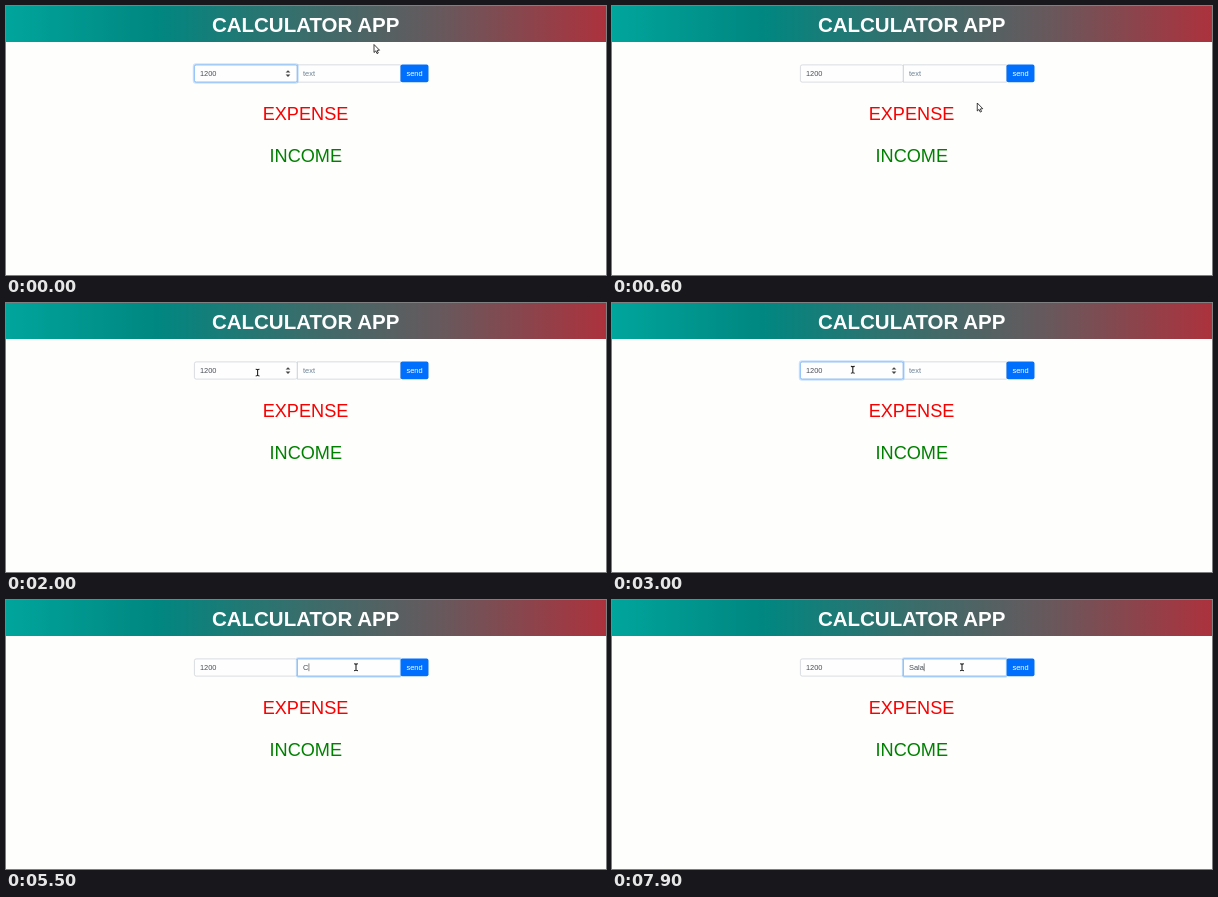
Recreate the animation shown at these times as an HTML page. Size 600 by 269 pixels, loop 8 s.

```html
<!DOCTYPE html>
<html lang="en">
<head>
<meta charset="utf-8">
<title>Calculator app</title>
<style>
  html, body { margin: 0; width: 100%; height: 100%; overflow: hidden; background: #fefefd; }
  svg { display: block; width: 600px; height: 269px; }
  text { font-family: "Liberation Sans", Arial, sans-serif; }
  .small { font-size: 7.45px; fill: #495057; }
  .big { font-size: 18.15px; text-anchor: middle; }
  .field { fill: #fefefe; stroke: #ced4da; stroke-width: .8; }
  .glow { fill: none; stroke: #007bff; stroke-opacity: .2; stroke-width: 1.5; }
  .ring { fill: none; stroke: #80bdff; stroke-width: .8; }
  .caret { stroke: #333; stroke-width: .6; }
</style>
</head>
<body>
<svg viewBox="0 0 600 269">
  <defs>
    <linearGradient id="bar">
      <stop offset="0" stop-color="#00a59c"/>
      <stop offset=".25" stop-color="#008781"/>
      <stop offset=".5" stop-color="#3a6d6b"/>
      <stop offset=".73" stop-color="#68585c"/>
      <stop offset="1" stop-color="#ac323d"/>
    </linearGradient>
  </defs>
  <rect width="600" height="269" fill="#fefefd"/>
  <rect width="600" height="36" fill="url(#bar)"/>
  <text x="299.7" y="26.1" text-anchor="middle" font-size="20.5" font-weight="bold" fill="#fefefe">CALCULATOR APP</text>
  <g id="edges" fill="none">
    <path d="M597.4 36V269" stroke="#dba3ab" stroke-width=".8"/>
    <path d="M2 1.8H597" stroke="#a5434b" stroke-width=".6" stroke-opacity=".6"/>
  </g>

  <rect class="field" x="188.4" y="58.9" width="102.8" height="17.2" rx="1.8"/>
  <rect class="field" x="291.4" y="58.9" width="103" height="17.2"/>
  <rect x="394.5" y="58.5" width="28" height="17.7" rx="1.9" fill="#006ffd"/>
  <text class="small" x="408.6" y="70" text-anchor="middle" style="fill:#fff">send</text>
  <g id="focus1">
    <rect class="glow" x="187.5" y="58" width="104.6" height="19" rx="2.5"/>
    <rect class="ring" x="188.4" y="58.9" width="102.8" height="17.2" rx="1.8"/>
  </g>
  <g id="focus2">
    <rect class="glow" x="290.6" y="58" width="104.6" height="19" rx="1.4"/>
    <rect class="ring" x="291.4" y="58.9" width="103" height="17.2" rx=".8"/>
  </g>
  <text class="small" x="193.9" y="70">1200</text>
  <path id="spinner" d="M279.6 66.6l2.4-2.3 2.4 2.3zM279.6 68.6l2.4 2.3 2.4-2.3z" fill="#454545"/>
  <text class="small" id="entry" x="297" y="70"></text>
  <path class="caret" id="caret1" d="M210.7 63.4V71.2"/>
  <path class="caret" id="caret2" d="M0 63.4V71.2"/>

  <text class="big" x="299.5" y="113.7" fill="#f80000">EXPENSE</text>
  <text class="big" x="299.8" y="156.1" fill="#008000">INCOME</text>

  <g id="pointer">
    <path id="arrow" d="M0 0V8L1.8 6.4 3 9.1 4.3 8.5 3.1 5.9 5.5 5.7Z" fill="#fff" stroke="#111" stroke-width=".8"/>
    <path id="beam" d="M-1.9-3.4Q0-3.4 0-2.5 0-3.4 1.9-3.4M0-2.7V2.7M-1.9 3.4Q0 3.4 0 2.5 0 3.4 1.9 3.4" fill="none" stroke="#222" stroke-width="1.1"/>
    <path id="hand" d="M-.8 0Q0-.9.8 0V3.2L4 4V6.8L3 9H-1.5L-3.2 5.4-2.4 4.8-.8 6Z" fill="#fff" stroke="#111" stroke-width=".7"/>
  </g>
</svg>
<script>
const LOOP = 8000, STEP = 100;
const $ = id => document.getElementById(id);
const show = (id, on) => $(id).setAttribute("opacity", +on);
const within = (t, ...spans) => spans.some(([a, b]) => t >= a && t < b);
const ramp = (t, a, b) => Math.max(0, Math.min(1, (t - a) / (b - a)));

// Pointer path: time, x, y
const path = [
  [0, 368, 38.5], [200, 325, 72.5], [500, 352, 92], [900, 405, 112],
  [1000, 380, 127], [1200, 314, 130.5], [1500, 282, 112], [1800, 262, 78],
  [1900, 257, 71], [2200, 240.8, 66.8], [3400, 240.8, 66.8],
  [3700, 411, 63.5], [4000, 350, 67.2], [LOOP, 350, 67.2]
];

// Contents of the second field: start time, text, caret x
const typing = [
  [0, "", 297.3], [5500, "C", 302.9], [6900, "", 297.3],
  [7500, "S", 302.3], [7700, "Sa", 306.4], [7800, "Sal", 308.1], [7900, "Sala", 312.2]
];

function pointerAt(t) {
  const i = path.findIndex(p => p[0] > t);
  const [t0, x0, y0] = path[i - 1], [t1, x1, y1] = path[i];
  const k = ramp(t, t0, t1);
  return [x0 + (x1 - x0) * k, y0 + (y1 - y0) * k];
}

function draw(t) {
  const [x, y] = pointerAt(t);
  const inRow = y > 58.5 && y < 76.2;
  const overField = inRow && x > 188 && x < 394.5;
  const overButton = inRow && x >= 394.5 && x < 422.5;
  $("pointer").setAttribute("transform", `translate(${x} ${y})`);
  show("beam", overField);
  show("hand", overButton);
  show("arrow", !overField && !overButton);

  show("edges", within(t, [100, 500]));
  show("focus1", t < 100 ? 1 : ramp(t, 2300, 2500) * (1 - ramp(t, 4200, 4500)));
  show("focus2", ramp(t, 4200, 4500));
  show("spinner", within(t, [0, 100], [1900, 4300]));
  show("caret1", within(t, [2400, 3000], [3500, 4100]));
  show("caret2", within(t, [4300, 4900], [5500, 6100], [6700, 7300], [7500, LOOP]));

  const [, value, caretX] = typing.filter(s => s[0] <= t).pop();
  $("entry").textContent = value || "text";
  $("entry").style.fill = value ? "#495057" : "#6c8294";
  $("caret2").setAttribute("transform", `translate(${caretX} 0)`);
}

const start = performance.now();
function tick() {
  const t = (performance.now() - start) % LOOP;
  draw(Math.floor(t / STEP) * STEP);
  requestAnimationFrame(tick);
}
tick();
</script>
</body>
</html>
```
